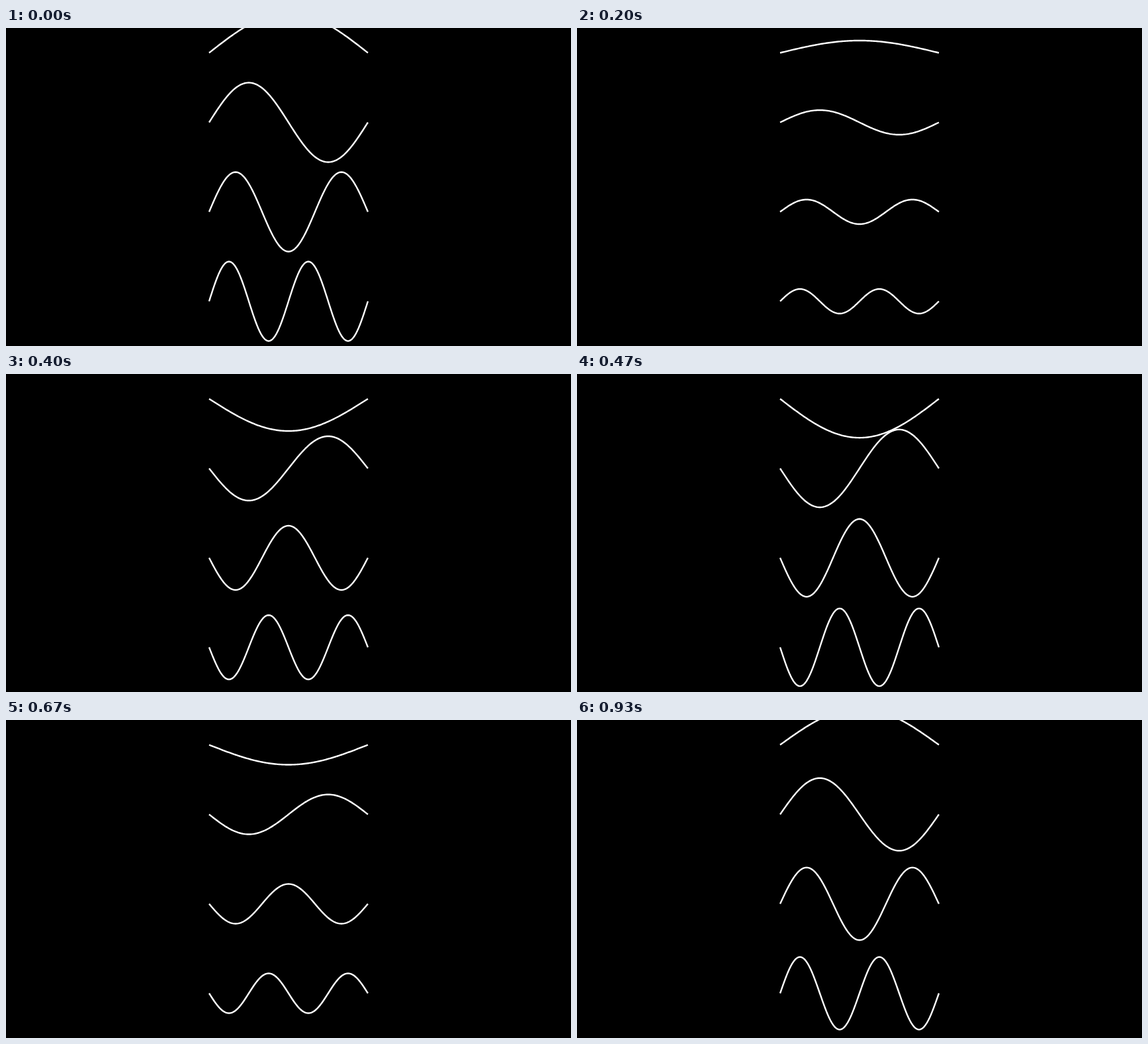
Recreate the animation shown at these times as an HTML page. Size 854 by 480 pixels, loop 990 ms.

```html
<!DOCTYPE html>
<html lang="en">
<head>
<meta charset="utf-8">
<title>Standing waves</title>
<style>
  html, body { margin: 0; width: 100%; height: 100%; overflow: hidden; background: #000; }
  svg { display: block; width: 854px; height: 480px; }
  path { fill: none; stroke: #fff; stroke-width: 2.4; stroke-linejoin: round; }
</style>
</head>
<body>
<svg viewBox="0 0 854 480"><path/><path/><path/><path/></svg>
<script>
  const LOOP = 990, STEPS = 15, AMP = 60;
  const LEFT = 307, WIDTH = 240;
  const baselines = [37.5, 142.5, 277.5, 412.5];
  const paths = document.querySelectorAll('path');

  // Steps run at 15 per second, with start times rounded to 10 ms.
  const starts = Array.from({ length: STEPS }, (_, i) => Math.round(i * 100 / STEPS) * 10);

  function wave(mode, base, amp) {
    const points = [];
    for (let x = 0; x <= WIDTH; x += 2) {
      const y = base - amp * Math.sin(mode * Math.PI * x / WIDTH);
      points.push(`${LEFT + x} ${y.toFixed(3)}`);
    }
    return 'M' + points.join('L');
  }

  let shown = -1;
  function draw() {
    const t = performance.now() % LOOP;
    const step = starts.filter(s => s <= t).length - 1;
    if (step !== shown) {
      shown = step;
      const amp = AMP * Math.cos(2 * Math.PI * step / STEPS);
      paths.forEach((p, i) => p.setAttribute('d', wave(i + 1, baselines[i], amp)));
    }
    requestAnimationFrame(draw);
  }
  draw();
</script>
</body>
</html>
```
